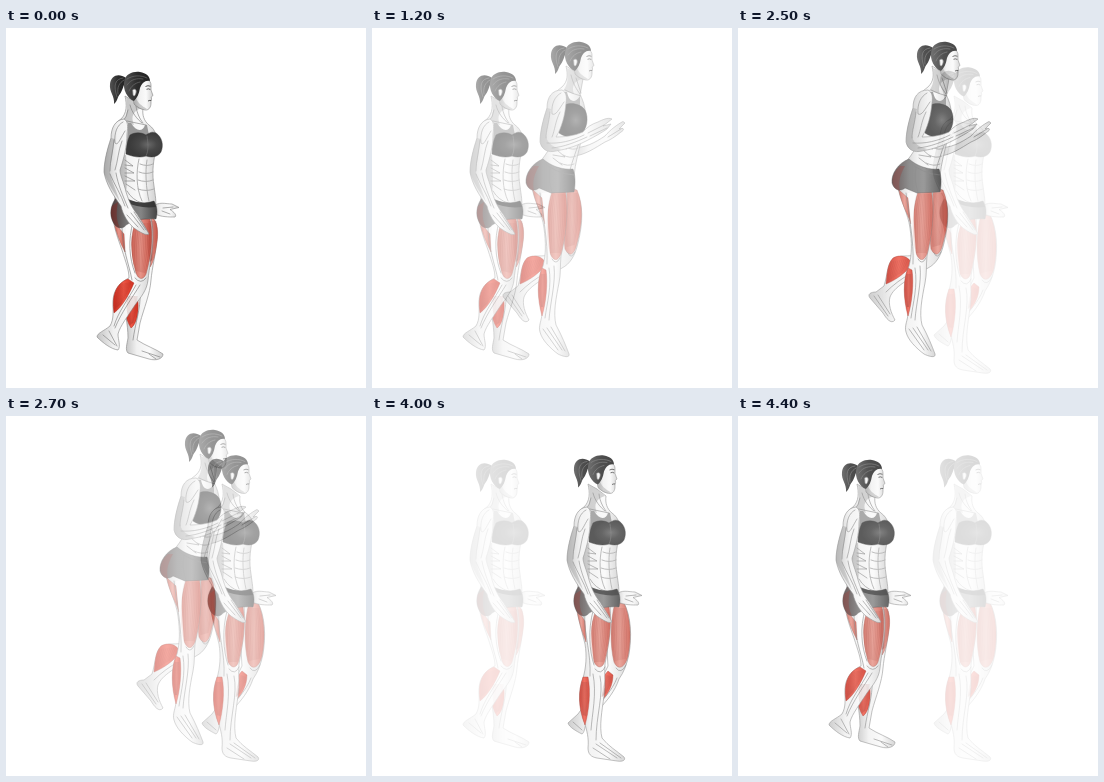
Animation of 360 by 360 pixels, one loop 4500 ms. Source, as an HTML page:

```html
<!DOCTYPE html>
<html lang="en">
<head>
<meta charset="utf-8">
<title>Walking exercise</title>
<style>
html, body { margin: 0; width: 100%; height: 100%; overflow: hidden; background: #fff; }
svg { display: block; width: 100vw; height: 100vh; }
.skin { fill: url(#skin); stroke: #858585; stroke-width: .6; stroke-linejoin: round; }
.quad { fill: url(#quad); stroke: #9c4b40; stroke-width: .4; }
.calf { fill: url(#calf); stroke: #a1261b; stroke-width: .4; }
.cloth { fill: url(#cloth); stroke: #333; stroke-width: .4; }
.shorts { fill: url(#shorts); stroke: #444; stroke-width: .4; }
.hair { fill: url(#hair); }
.line { fill: none; stroke: #777; stroke-width: .6; stroke-linecap: round; }
.soft { fill: none; stroke: #a9a9a9; stroke-width: .9; stroke-linecap: round; }
.lite { fill: #fff; opacity: .75; }
.shade { fill: #777; opacity: .35; }
.grain { fill: none; stroke: #8c2c22; stroke-width: .35; opacity: .45; }
.fiber { fill: none; stroke: #666; stroke-width: .4; opacity: .55; }
</style>
</head>
<body>
<svg viewBox="0 0 360 360">
<defs>
  <linearGradient id="skin"><stop offset="0" stop-color="#c4c4c4"/><stop offset=".3" stop-color="#f1f1f1"/><stop offset=".65" stop-color="#fafafa"/><stop offset="1" stop-color="#cfcfcf"/></linearGradient>
  <linearGradient id="quad"><stop offset="0" stop-color="#c75e51"/><stop offset=".45" stop-color="#e69488"/><stop offset="1" stop-color="#cb5547"/></linearGradient>
  <linearGradient id="calf"><stop offset="0" stop-color="#c52a1d"/><stop offset=".5" stop-color="#ee5544"/><stop offset="1" stop-color="#cf3021"/></linearGradient>
  <radialGradient id="cloth" cx=".6" cy=".5"><stop offset="0" stop-color="#686868"/><stop offset=".5" stop-color="#484848"/><stop offset="1" stop-color="#3b3b3b"/></radialGradient>
  <linearGradient id="shorts"><stop offset="0" stop-color="#4b3b3b"/><stop offset=".35" stop-color="#777"/><stop offset=".65" stop-color="#858585"/><stop offset="1" stop-color="#454545"/></linearGradient>
  <linearGradient id="hair"><stop offset="0" stop-color="#555"/><stop offset=".5" stop-color="#2c2c2c"/><stop offset="1" stop-color="#222"/></linearGradient>

  <g id="head">
    <path class="hair" d="M120 50C113 45 105 47 104 56C103 64 109 68 108 76C112 73 111 69 114 66C117 62 117 57 120 54Z"/>
    <path class="line" stroke-width=".4" d="M117 50C109 51 107 57 111 69M118 52C113 55 111 59 112 66"/>
    <path class="skin" d="M135 52C140 50 145 52 145 57L145 62L147 67.5L145.2 69L145.6 71L145 73L145 75C145 79 143 82 140 82C136 82 131 79 128 76C126 68 129 57 135 52Z"/>
    <path class="shade" d="M129 67C131 75 136 78 141 81C136 83 131 80 128 76Z"/>
    <path class="hair" d="M118.500 52C120 46 127 43 134 44C140 45 144 48 144 53C139 52 136 55 134 60C133 66 131 70 128 73C122 71 116 62 118.500 52Z"/>
    <path class="line" d="M121 51C127 47 135 47 141 50M121 57C125 51 131 50 137 51M123 63C125 58 129 55 134 54"/>
    <path class="skin" d="M126.500 62C129 60 131 62 130 65C129 68 128 69 127 67Z"/>
    <path fill="none" stroke="#333" stroke-width=".8" d="M139.500 58.500Q142 57 144.500 58.300M140.500 61.300Q142.500 60.300 144.300 61.500M142 73Q144 72 145.200 72.500"/>
  </g>

  <g id="bust">
    <path class="skin" d="M147 179C152 173 160 176 166 176L173 179.500L164 181.500C168 184 171 187 169 189C163 189 155 189 149 186Z"/>
    <path class="line" d="M157 180L167 179M156 183L164 186"/>
    <path class="skin" d="M119 68C121 77 121 85 115 91C109 95 107 99 108 106L113 130C116 145 113 156 109 168L108 183L149 183C151 174 149 167 148 158C146 146 147 136 149 126C153 110 150 102 143 97C138 93 136 87 137 80L128 73Z"/>
    <path class="shade" d="M120 69C122 80 121 88 117 94L128 97C124 88 128 82 136 80L128 73Z"/>
    <path class="line" d="M124 77C126 85 131 91 136 95M130 78C131 86 134 91 137 95M121 93Q130 95 140 97M122 82Q121 89 117 93"/>
    <path class="shade" d="M112 128C117 143 115 157 110 171L119 172C122 157 121 142 120 127Z"/>
    <path class="soft" d="M134 136Q141 139 147 136M133 144Q140 147 147 144M132 152Q140 155 147 152M132 161Q140 164 148 161M141 132C139 144 140 160 143 173M133 131C130 144 130 160 136 173"/>
    <path class="line" d="M119 132L127 138L119 137M119 140L128 145L119 145M119 148L129 153L119 153M120 156L129 162M121 163Q126 172 136 175"/>
    <path class="shorts" d="M113 167C107 172 104 180 105 188C107 198 113 202 118 199C124 193 134 190 150 191C152 184 151 178 148 173C136 177 122 174 113 167Z"/>
    <path fill="#7d2b27" opacity=".55" d="M106 178C103 187 107 198 114 200C110 192 110 184 112 174Z"/>
    <path fill="#2e2e2e" opacity=".8" d="M120 170Q136 178 148 173L150 179Q134 181 119 174Z"/>
    <path fill="#999" d="M122 95C122 104 121 114 120 123L130 113L143 107L141 97L139 97C137 104 130 104 125 95Z"/>
    <path class="cloth" d="M124 107C121 113 120 120 120 126C128 129 134 130 140 128C146 130 152 129 155 124C158 117 156 109 150 105C146 103 143 105 140 107C135 104 129 104 124 107Z"/>
    <path class="line" stroke="#222" d="M141 108C142 115 143 122 140 128"/>
    <path class="skin" d="M118 91C109 92 105 100 105 110C101 122 98 134 98 144C100 156 107 167 115 178C117 187 122 195 128 200C134 204 140 208 143 206C140 200 136 194 131 186C126 180 122 172 119 160C116 150 114 146 114 142C118 130 121 118 121 106C122 98 122 93 118 91Z"/>
    <path class="shade" d="M105 110C100 124 98 136 98 145C102 155 108 165 114 174C110 160 103 150 104 139C107 127 107 119 109 111Z"/>
    <path class="line" d="M117 94C111 97 108 105 109 115C112 118 114 111 119 103M108 112C107 124 104 132 104 143M116 113C112 123 112 133 109 142M104 146C108 156 115 166 119 178M110 145C112 157 117 168 122 180M121 187L132 199M125 185L138 202M128 184L140 202"/>
  </g>
</defs>

<g id="start">
  <rect width="360" height="360" fill="#fff"/>
  <path class="skin" d="M135 183C148 185 152 195 151 210C150 225 146 240 145 252C144 266 138 280 134 295L131 312C140 318 150 321 157 326C157 331 150 333 143 331L122 325C119 322 121 316 122 310C122 295 118 285 120 270L130 245Z"/>
  <path class="quad" d="M142 190C150 187 153 200 151 214C149 228 147 235 144 239C142 222 141 205 142 190Z"/>
  <path class="calf" d="M122 264C117 275 119 291 125 300C131 296 134 282 131 265Z"/>
  <path class="line" d="M134 266C135 280 129 296 127 312M143 326L150 331M136 323L154 329"/>
  <path class="skin" d="M106 185C108 200 112 211 116 222C120 235 123 242 123 250C114 254 107 262 107 274C107 284 108 291 104 298C98 303 91 305 91 309C97 315 105 321 112 322C115 318 112 312 112 306C114 298 122 288 129 277C135 269 141 262 142 252C143 240 147 225 147 210C147 198 146 190 142 184Z"/>
  <path class="quad" d="M131 191C124 205 124 225 129 241C131 252 137 253 140 246C144 232 148 210 144 191Z"/>
  <path class="quad" d="M108 194C110 205 114 214 119 224L118 206Z"/>
  <path class="calf" d="M122 251C111 255 105 266 108 285C116 279 123 267 128 255Z"/>
  <path class="lite" d="M120 197C118 215 121 235 128 252C128 233 122 215 127 196Z"/>
  <path class="line" d="M116 200C116 220 123 236 126 252M127 194C122 212 123 230 129 245M129 250Q135 257 140 250M134 257C126 270 115 285 109 300M130 257C122 272 112 284 108 298M97 307L109 317M103 303L111 318"/>
  <use href="#bust"/>
  <use href="#head"/>
</g>

<g id="lift" opacity="0">
  <rect width="360" height="360" fill="#fff"/>
  <path class="skin" d="M185 158L203 161C212 175 211 195 206 215C203 228 198 236 190 240L165 255C158 260 154 264 152 269C150 276 153 285 157 292C153 297 148 290 145 285L132 270C129 266 133 264 138 264L146 258C150 245 149 235 156 230C165 226 175 230 182 225Z"/>
  <path class="quad" d="M196 161C192 180 191 205 193 221C198 231 203 225 205 215C210 198 212 178 205 162Z"/>
  <path class="calf" d="M155 230C149 236 149 248 148 256C158 252 169 244 174 236C171 228 162 226 155 230Z"/>
  <path class="line" d="M174 245C164 250 155 257 148 264M140 267L152 286M136 268L150 288M196 225Q199 232 203 224"/>
  <path class="skin" d="M158 153C163 175 170 185 172 200C174 215 174 226 171 238C165 250 166 270 170 285C170 292 166 298 168 304C170 312 178 320 186 326C192 329 198 330 197 326C194 318 190 308 184 297C181 285 184 270 187 255C189 245 188 238 189 228C193 210 197 185 194 160Z"/>
  <path class="quad" d="M181 161C174 180 173 205 178 225C182 236 188 232 190 222C194 205 197 182 193 161Z"/>
  <path class="quad" d="M161 162C163 175 169 184 173 196L170 170Z"/>
  <path class="calf" d="M170 240C165 252 165 270 170 288C174 275 176 255 174 242Z"/>
  <path class="lite" d="M170 165C172 188 174 212 178 233C178 210 173 188 178 164Z"/>
  <path class="line" d="M168 165C171 190 176 212 175 236M180 231Q184 238 188 230M182 238C184 255 178 275 177 292M177 240C180 258 175 275 173 290M175 300L190 322M179 299L193 323M171 301L186 322"/>
  <path class="skin" d="M201 119C212 121 224 114 233 108C238 102 246 96 251 93.500L253 95L247 101C252 99 253 102 249 104C243 109 238 112 233 114C223 120 213 127 202 128Z"/>
  <path class="skin" d="M194 38C196 47 196 53 190 59C183 64 178 70 178 80L180 112C178 124 169 131 165 139L168 146L202 148C203 136 207 122 210 109C216 95 214 76 208 67L211 51L202 43Z"/>
  <path class="shade" d="M195 40C197 50 195 58 191 63L202 66C199 58 203 52 211 51L202 43Z"/>
  <path class="line" d="M199 47C201 56 205 62 208 66M204 50L209 65M193 62Q201 66 209 68M189 114L195 121L186 119M185 122L193 129L181 127M181 130L190 137M208 112C204 123 200 134 198 142"/>
  <path class="soft" d="M194 119Q201 123 206 120M191 127Q198 131 204 128M188 135Q196 139 202 136"/>
  <path class="shorts" d="M171 131C160 135 153 146 154 155C156 162 162 164 167 160L179 165L202 164C204 155 203 146 201 141C190 142 179 138 171 131Z"/>
  <path fill="#7d2b27" opacity=".5" d="M162 138C152 147 152 160 162 163C160 154 162 147 167 138Z"/>
  <path class="line" stroke="#444" d="M170 133Q184 146 202 147M178 140C176 150 178 158 180 164M191 144L188 164"/>
  <path fill="#929292" d="M192 64C191 77 190 90 188 101L196 87L208 80L208 68C203 76 197 74 195 64Z"/>
  <path class="cloth" d="M193 77C189 86 187 96 187 105C194 110 203 110 209 106C215 101 217 90 213 82C209 76 199 74 193 77Z"/>
  <path class="skin" d="M190 62C180 62 175 69 175 80C171 92 168 104 168 114C170 122 176 125 184 123C196 121 207 117 216 112C222 109 229 105 235 101L239 96L231 98L240 91C236 89 230 92 226 94C220 96 215 99 211 104C202 108 192 109 184 109C190 99 193 87 194 75C195 68 194 64 190 62Z"/>
  <path class="shade" d="M175 80C169 96 167 109 169 118C173 124 181 125 189 121C180 119 174 114 174 106C177 94 177 88 179 81Z"/>
  <path class="line" d="M189 65C183 68 179 76 180 86C184 88 187 81 192 74M178 84C177 95 174 102 174 110M188 84C183 94 183 102 180 109M175 115C187 116 200 113 212 107M180 120C192 119 204 114 215 109M216 105L232 97M218 108L235 100M236 109L249 101"/>
  <use href="#head" x="75" y="-30"/>
</g>

<g id="finish" opacity="0">
  <rect width="360" height="360" fill="#fff"/>
  <path class="skin" d="M232 183L252 187C259 200 260 220 257 238C255 248 252 256 247 263C243 275 235 285 227 293L214 306C213 312 212 317 210 318C204 315 197 311 196 307L206 298L226 270L236 250Z"/>
  <path class="quad" d="M243 187C238 205 238 230 242 246C246 255 253 252 256 240C260 220 258 200 252 187Z"/>
  <path class="calf" d="M236 255C229 262 227 272 229 285C236 279 241 269 241 259Z"/>
  <path class="line" d="M244 252Q249 259 254 249M245 262C240 275 229 287 214 301M201 306L210 314"/>
  <path class="skin" d="M203 185C205 198 209 212 213 228C215 240 214 252 211 262C206 275 207 290 212 305C215 315 217 322 216 332C216 338 219 341 225 342L245 345C251 346 254 344 252 341C245 335 236 330 230 322C227 310 230 295 232 280C234 268 232 258 233 248C236 230 240 215 238 188Z"/>
  <path class="quad" d="M225 192C217 210 217 230 222 246C227 255 232 250 233 244C237 228 240 208 237 191Z"/>
  <path class="quad" d="M205 194C207 206 210 216 214 226L213 205Z"/>
  <path class="calf" d="M211 261C206 275 206 292 213 309C217 295 219 275 216 261Z"/>
  <path class="lite" d="M214 198C213 220 217 240 222 255C222 235 216 215 222 196Z"/>
  <path class="line" d="M212 200C213 220 219 238 218 260M221 195C216 214 217 234 222 249M223 253Q229 260 233 251M228 260C232 278 224 300 224 324M221 258C225 278 220 298 219 314M224 328L245 342M228 327L249 342M221 332L238 343"/>
  <use href="#bust" x="97"/>
  <use href="#head" x="98" y="-4.500"/>
</g>
</svg>
<script>
// Muscle strands: upper edge x,y,x,y then lower edge x,y,x,y.
const strands = {
  start: [[131, 195, 143, 195, 130, 243, 139, 245], [143, 193, 150, 193, 144, 234, 146, 232],
          [114, 256, 125, 254, 109, 281, 115, 276], [121, 268, 131, 268, 124, 297, 127, 295]],
  lift: [[181, 166, 192, 166, 179, 225, 188, 225], [197, 165, 205, 165, 195, 219, 202, 217],
         [154, 233, 170, 231, 150, 253, 163, 245], [169, 246, 173, 246, 169, 279, 171, 279]],
  finish: [[224, 196, 236, 196, 223, 246, 231, 246], [243, 192, 252, 192, 243, 245, 253, 243],
           [210, 266, 215, 266, 211, 299, 214, 300], [235, 259, 240, 261, 230, 281, 234, 277]]
};
const mix = (a, b, k) => a + (b - a) * k;

function strandPath([ax, ay, bx, by, cx, cy, dx, dy], count = 9) {
  let d = "";
  for (let i = 0; i < count; i++) {
    const k = i / (count - 1);
    const x = mix(ax, bx, k), y = mix(ay, by, k);
    const u = mix(cx, dx, k), v = mix(cy, dy, k);
    const bow = (k - .5) * (v - y) * .16;
    d += `M${x} ${y}Q${(x + u) / 2 + bow} ${(y + v) / 2} ${u} ${v}`;
  }
  return d;
}

for (const [id, list] of Object.entries(strands)) {
  const path = document.createElementNS("http://www.w3.org/2000/svg", "path");
  path.setAttribute("class", "grain");
  path.setAttribute("d", list.map(s => strandPath(s)).join(""));
  const pose = document.getElementById(id);
  pose.insertBefore(path, pose.querySelector(id === "lift" ? ".shorts" : "use"));
}

// Dissolves advance in sixths, one every 100 ms.
const LOOP = 4500, STEP = 100, STEPS = 6;
const lift = document.getElementById("lift");
const finish = document.getElementById("finish");
const fade = (t, from) =>
  Math.max(0, Math.min(STEPS, Math.floor((t - from) / STEP) + 1)) / STEPS;

let begin;
function draw(now) {
  begin ??= now;
  const t = (now - begin) % LOOP;
  lift.setAttribute("opacity", t < 3000 ? fade(t, 1000) : 0);
  finish.setAttribute("opacity", fade(t, 2500) - fade(t, 4000));
  requestAnimationFrame(draw);
}
requestAnimationFrame(draw);
</script>
</body>
</html>
```
